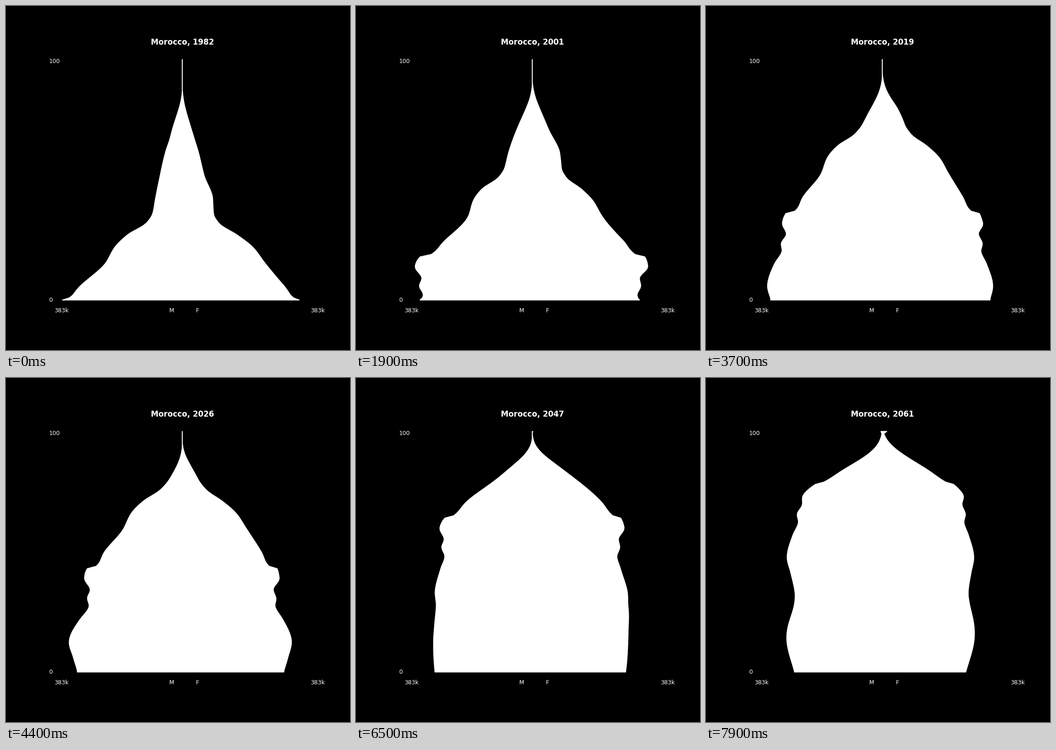
A matplotlib script that plays this animation: 748 px wide and 748 px high, repeating every 8000 ms.

```python
import numpy as np
import matplotlib.pyplot as plt
from matplotlib.animation import FuncAnimation
from matplotlib.patches import Polygon

SIZE, DPI = 748, 100
START, YEARS, STEP_MS = 1982, 80, 100
EDGE_PT = 1.0
EDGE = EDGE_PT * DPI / 72 / 2
AGES = np.arange(101)

# Turning points of cohort size: birth year, men, women (pixels at midlife).
COHORTS = np.array([
    (1900, 38, 24), (1914, 38, 34), (1920, 43, 40), (1930, 50, 49),
    (1940, 58, 65.5), (1946, 62.5, 65.5), (1950, 74.5, 74.5),
    (1955, 109.5, 107), (1960, 126, 130), (1966, 133, 144), (1976, 168, 171),
    (1982, 184, 186), (1983, 203, 203), (1987, 208.5, 206), (1992, 195, 190),
    (1995, 199, 192), (1999, 191, 184.5), (2004, 199, 191), (2013, 208.5, 200),
    (2020, 199, 192), (2030, 186, 179), (2047, 179, 170.5), (2061, 162, 153),
]).T


def smooth(x, y, at):
    """Monotone cubic interpolation."""
    h = np.diff(x)
    d = np.diff(y) / h
    m = np.zeros(len(x))
    m[0], m[-1] = d[0], d[-1]
    w1, w2 = 2 * h[1:] + h[:-1], h[1:] + 2 * h[:-1]
    same = d[:-1] * d[1:] > 0
    a, b = np.where(same, d[:-1], 1), np.where(same, d[1:], 1)
    m[1:-1] = np.where(same, (w1 + w2) / (w1 / a + w2 / b), 0)
    i = np.clip(np.searchsorted(x, at, side="right") - 1, 0, len(h) - 1)
    t = (at - x[i]) / h[i]
    return ((1 + 2 * t) * (1 - t) ** 2 * y[i] + t * (1 - t) ** 2 * h[i] * m[i]
            + t * t * (3 - 2 * t) * y[i + 1] + t * t * (t - 1) * h[i] * m[i + 1])


def half_width(year, sizes, child, leave, leave_age, leave_span, extra_life):
    """Width of one sex per age: cohort size times its life-course losses."""
    born = year - AGES
    cohort = smooth(COHORTS[0], sizes, np.maximum(born, COHORTS[0, 0]))

    risk = child * np.minimum(0.16 * np.exp((1987 - born) / 19), 0.25)
    childhood = 1 + risk * np.exp(-np.sqrt(AGES / 12))
    emigration = 1 + leave / (1 + np.exp((AGES - leave_age) / leave_span))

    # Gompertz mortality with a slowly rising lifespan.
    lifespan = 82 + 0.14 * (year - 2026) + extra_life
    survival = np.exp(-np.exp((AGES - lifespan) / 8.3))

    width = cohort * childhood * emigration * survival
    width[-1] *= 4  # open-ended group of 100 and over
    return np.maximum(width - EDGE, 0.3)


def outline(year):
    men = half_width(year, COHORTS[1], 1, 0.18, 23, 4, 0)
    women = half_width(year, COHORTS[2], 0.75, 0.19, 26, 4.8, 1.8)
    left = np.column_stack([-men, AGES])
    right = np.column_stack([women, AGES])
    return np.vstack([left, right[::-1]])


fig = plt.figure(figsize=(SIZE / DPI, SIZE / DPI), dpi=DPI, facecolor="black")
plt.rcParams["font.family"] = "DejaVu Sans"
ax = fig.add_axes([0.125, 0.11, 0.775, 0.77])
half = 0.775 * SIZE / 2
ax.set(xlim=(-half, half), ylim=(-5, 105))
ax.axis("off")


def label(x, y, text, size=9, **kw):
    return ax.text(x, y, text, color="white", fontsize=size,
                   transform=ax.transAxes, **kw)


label(0, 0.94, "100")
label(0, 0.04, "0")
for x, text in ((0.02, "383k"), (0.45, "M"), (0.55, "F"), (0.98, "383k")):
    label(x, 0, text)
title = label(0.5, 1.01, "", size=12, weight="bold", ha="center")
shape = ax.add_patch(Polygon(outline(START), closed=True, facecolor="white",
                             edgecolor="white", linewidth=EDGE_PT,
                             joinstyle="miter", clip_on=False))


def update(i):
    year = START + i
    shape.set_xy(outline(year))
    title.set_text(f"Morocco, {year}")
    return shape, title


anim = FuncAnimation(fig, update, frames=YEARS, interval=STEP_MS, repeat=True,
                     repeat_delay=0)
plt.show()
```
